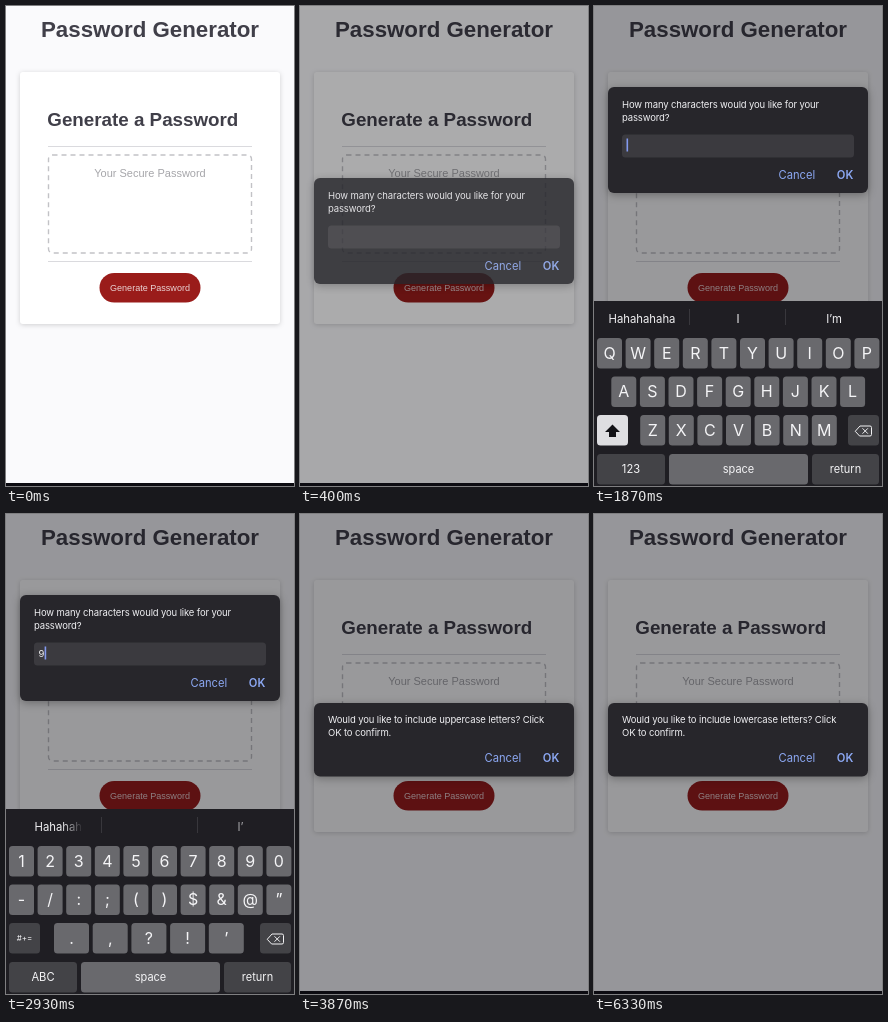
Write an HTML page that moves like this. It is 288 px wide and 480 px high and loops after 6470 ms.

```html
<!DOCTYPE html>
<html lang="en">
<head>
<meta charset="utf-8">
<title>Password Generator</title>
<style>
  html, body { margin: 0; width: 100%; height: 100%; overflow: hidden; background: #fafafc; }
  svg { display: block; width: 100%; height: 100%; }
  .page { font-family: "Liberation Sans", Arial, Helvetica, sans-serif; }
  .ui { font-family: Inter, Roboto, sans-serif; }
  .head { font-weight: 700; fill: #403f49; }
  .mid { text-anchor: middle; }
  .card { fill: #fff; filter: drop-shadow(0 1px 2.5px rgba(0, 0, 0, .17)); }
  .rule { stroke: #dadade; }
  .dash { fill: none; stroke: #c2c2c6; stroke-width: 1.4; stroke-dasharray: 5 4; }
  .box { fill: #27262b; filter: drop-shadow(0 2px 4px rgba(0, 0, 0, .3)); }
  .msg { font-size: 9.5px; letter-spacing: -.13px; fill: #efeff2; }
  .act { font-size: 11.2px; fill: #8ca8f3; }
  .ok { font-weight: 600; }
  .caret { fill: #8399ee; }
  .key { fill: #69696d; }
  .fn { fill: #434347; }
  .cap { font-size: 16px; fill: #f4f4f6; }
  .word { font-size: 11.3px; fill: #f1f1f3; }

  /* One 6470 ms cycle shared by every part */
  .dim, .ask, .move, .board, .upper, .lower { animation: 6470ms linear infinite; }
  .focus, .typed, .blank, .letters, .digits, .hints { animation: 6470ms step-end infinite; }
  .dim { animation-name: dim; }
  .ask { animation-name: ask; }
  .move { animation-name: move; }
  .board { animation-name: board; }
  .upper { animation-name: upper; }
  .lower { animation-name: lower; }
  .focus { animation-name: focus; }
  .typed { animation-name: typed; }
  .blank { animation-name: blank; }
  .letters { animation-name: letters; }
  .digits { animation-name: digits; }
  .hints { animation-name: hints; }
  .fading { animation: fading 6470ms linear infinite; }

  @keyframes dim {
    0% { opacity: 0; }
    2% { opacity: 0; animation-timing-function: cubic-bezier(.5, 1, .89, 1); }
    9.27%, 49.46% { opacity: 1; }
    53.63% { opacity: .82; }
    58.73%, 100% { opacity: 1; }
  }
  @keyframes ask {
    0% { opacity: 0; }
    2% { opacity: 0; animation-timing-function: cubic-bezier(.5, 1, .89, 1); }
    9.27%, 49.46% { opacity: 1; }
    53.63%, 100% { opacity: 0; }
  }
  @keyframes move {
    0%, 22.71% { transform: translateY(0); }
    22.72% { transform: translateY(-25px); animation-timing-function: cubic-bezier(.3, .75, .4, 1); }
    28.4% { transform: translateY(-91px); }
    49.46% { transform: translateY(-91px); animation-timing-function: ease-in-out; }
    55%, 100% { transform: translateY(0); }
  }
  @keyframes board {
    0%, 22.71% { transform: translateY(185px); }
    22.72% { transform: translateY(172px); animation-timing-function: cubic-bezier(.35, .65, .3, 1); }
    28.8% { transform: translateY(0); }
    49.46% { transform: translateY(0); animation-timing-function: cubic-bezier(.4, .3, .4, 1); }
    55.5%, 100% { transform: translateY(185px); }
  }
  @keyframes upper {
    0% { opacity: 0; }
    52.8% { opacity: 0; animation-timing-function: cubic-bezier(.5, 1, .89, 1); }
    58.73%, 86.55% { opacity: 1; }
    90.7%, 100% { opacity: 0; }
  }
  @keyframes lower {
    0% { opacity: 0; }
    89.8% { opacity: 0; animation-timing-function: cubic-bezier(.5, 1, .89, 1); }
    95.83%, 100% { opacity: 1; }
  }
  @keyframes focus { 0% { opacity: 0; } 22.72%, 100% { opacity: 1; } }
  @keyframes blank { 0% { opacity: 1; } 40.19%, 100% { opacity: 0; } }
  @keyframes typed { 0% { opacity: 0; } 40.19%, 100% { opacity: 1; } }
  @keyframes letters { 0% { opacity: 1; } 32.92%, 100% { opacity: 0; } }
  @keyframes digits { 0% { opacity: 0; } 32.92%, 100% { opacity: 1; } }
  @keyframes hints { 0% { opacity: 1; } 43.28%, 100% { opacity: 0; } }
  @keyframes fading {
    0%, 43.27% { opacity: 0; }
    43.28%, 45.5% { opacity: 1; }
    47.6%, 100% { opacity: 0; }
  }
</style>
</head>
<body>
<svg viewBox="0 0 288 480" preserveAspectRatio="none">
  <defs>
    <linearGradient id="tail" gradientUnits="userSpaceOnUse" x1="56" y1="0" x2="77" y2="0">
      <stop offset="0" stop-color="#f1f1f3"/>
      <stop offset="1" stop-color="#f1f1f3" stop-opacity="0"/>
    </linearGradient>
  </defs>

  <g class="page">
    <rect width="288" height="480" fill="#fafafc"/>
    <text class="head mid" x="144" y="31" font-size="22.3">Password Generator</text>
    <rect class="card" x="14" y="66" width="260" height="252" rx="3"/>
    <text class="head" x="41.3" y="119.6" font-size="18.8">Generate a Password</text>
    <path class="rule" d="M42 140.5H246M42 255.5H246"/>
    <rect class="dash" x="42.5" y="149" width="203" height="98" rx="4"/>
    <text class="mid" x="144" y="171" font-size="11" fill="#a6a6aa">Your Secure Password</text>
    <rect x="93.5" y="267" width="101" height="29.5" rx="14.75" fill="#9a1c1a"/>
    <text class="mid" x="144" y="285.3" font-size="9.05" fill="#ead3d4">Generate Password</text>
  </g>

  <rect class="dim" width="288" height="480" fill="rgba(2,2,5,.4)"/>
  <rect y="477" width="288" height="3" fill="#0c0b11"/>

  <g class="ui ask"><g class="move">
    <rect class="box" x="14" y="172" width="260" height="106" rx="6"/>
    <text class="msg" x="28" y="192.5">How many characters would you like for your</text>
    <text class="msg" x="28" y="205.8">password?</text>
    <rect x="28" y="219.5" width="232" height="23" rx="3.5" fill="#3b3a3f"/>
    <g class="focus">
      <rect class="caret blank" x="32.5" y="223.5" width="1.6" height="13"/>
      <g class="typed">
        <text class="msg" x="32.5" y="234.3">9</text>
        <rect class="caret" x="38.6" y="223.5" width="1.6" height="13"/>
      </g>
    </g>
    <text class="act" x="184.5" y="264">Cancel</text>
    <text class="act ok" x="242.8" y="264">OK</text>
  </g></g>

  <g class="ui" id="confirms"></g>

  <g class="ui board">
    <rect y="295" width="288" height="185" fill="#1f1e23"/>
    <path d="M95.5 303V319M191.5 303V319" stroke="#38373c"/>
    <g class="hints">
      <text class="word mid" x="48" y="317">Hahahahaha</text>
      <text class="word mid" x="144" y="317">I</text>
      <text class="word mid" x="240" y="317">I’m</text>
    </g>
    <g class="fading">
      <text class="word" x="28.5" y="317" style="fill:url(#tail)">Hahahaha</text>
      <text class="word" x="231.5" y="317" opacity=".65">I’</text>
    </g>
    <g class="letters" id="letters"></g>
    <g class="digits" id="digits"></g>
    <g id="shared"></g>
    <g fill="none" stroke="#f1f1f3" stroke-linecap="round" stroke-linejoin="round">
      <path d="M261.5 425L266 420H276Q277.5 420 277.5 421.5V428.5Q277.5 430 276 430H266Z"/>
      <path d="M268.8 422.6L273.6 427.4M273.6 422.6L268.8 427.4"/>
    </g>
  </g>
</svg>
<script>
  const NS = "http://www.w3.org/2000/svg";
  const byId = id => document.getElementById(id);

  function add(parent, tag, attrs, text) {
    const el = document.createElementNS(NS, tag);
    for (const name in attrs) el.setAttribute(name, attrs[name]);
    if (text) el.textContent = text;
    return parent.appendChild(el);
  }

  function key(parent, x, y, width, label, kind = "key", size = 16) {
    add(parent, "rect", { class: kind, x, y, width, height: 30.5, rx: 3.5 });
    if (!label) return;
    add(parent, "text", {
      class: "cap mid", x: x + width / 2, y: y + 15.2 + size * .36, style: `font-size:${size}px`
    }, label);
  }

  function row(parent, labels, x, y, pitch = 28.6, width = 25) {
    [...labels].forEach((label, i) => key(parent, x + i * pitch, y, width, label));
  }

  function confirmBox(kind) {
    const g = add(byId("confirms"), "g", { class: kind });
    add(g, "rect", { class: "box", x: 14, y: 189, width: 260, height: 73.5, rx: 6 });
    add(g, "text", { class: "msg", x: 28, y: 209 }, `Would you like to include ${kind}case letters? Click`);
    add(g, "text", { class: "msg", x: 28, y: 222 }, "OK to confirm.");
    add(g, "text", { class: "act", x: 184.5, y: 248.2 }, "Cancel");
    add(g, "text", { class: "act ok", x: 242.8, y: 248.2 }, "OK");
  }

  const [letters, digits, shared] = ["letters", "digits", "shared"].map(byId);

  row(letters, "QWERTYUIOP", 3, 332);
  row(letters, "ASDFGHJKL", 17.3, 370.5);
  row(letters, "ZXCVBNM", 46.2, 409);
  key(letters, 3, 409, 31, "", "shift");
  letters.lastChild.setAttribute("fill", "#dedee1");
  add(letters, "path", { d: "M18.5 418.5L26 426H22V431H15V426H11Z", fill: "#111115" });
  key(letters, 3, 448, 68, "123", "fn", 11.2);

  row(digits, "1234567890", 3, 332);
  row(digits, "-/:;()$&@”", 3, 370.5);
  row(digits, ".,?!’", 48, 409, 38.7, 35);
  key(digits, 3, 409, 31, "#+=", "fn", 8);
  key(digits, 3, 448, 68, "ABC", "fn", 11.2);

  key(shared, 254, 409, 31, "", "fn");
  key(shared, 75, 448, 139, "space", "key", 11);
  key(shared, 218, 448, 67, "return", "fn", 11);

  confirmBox("upper");
  confirmBox("lower");
</script>
</body>
</html>
```
